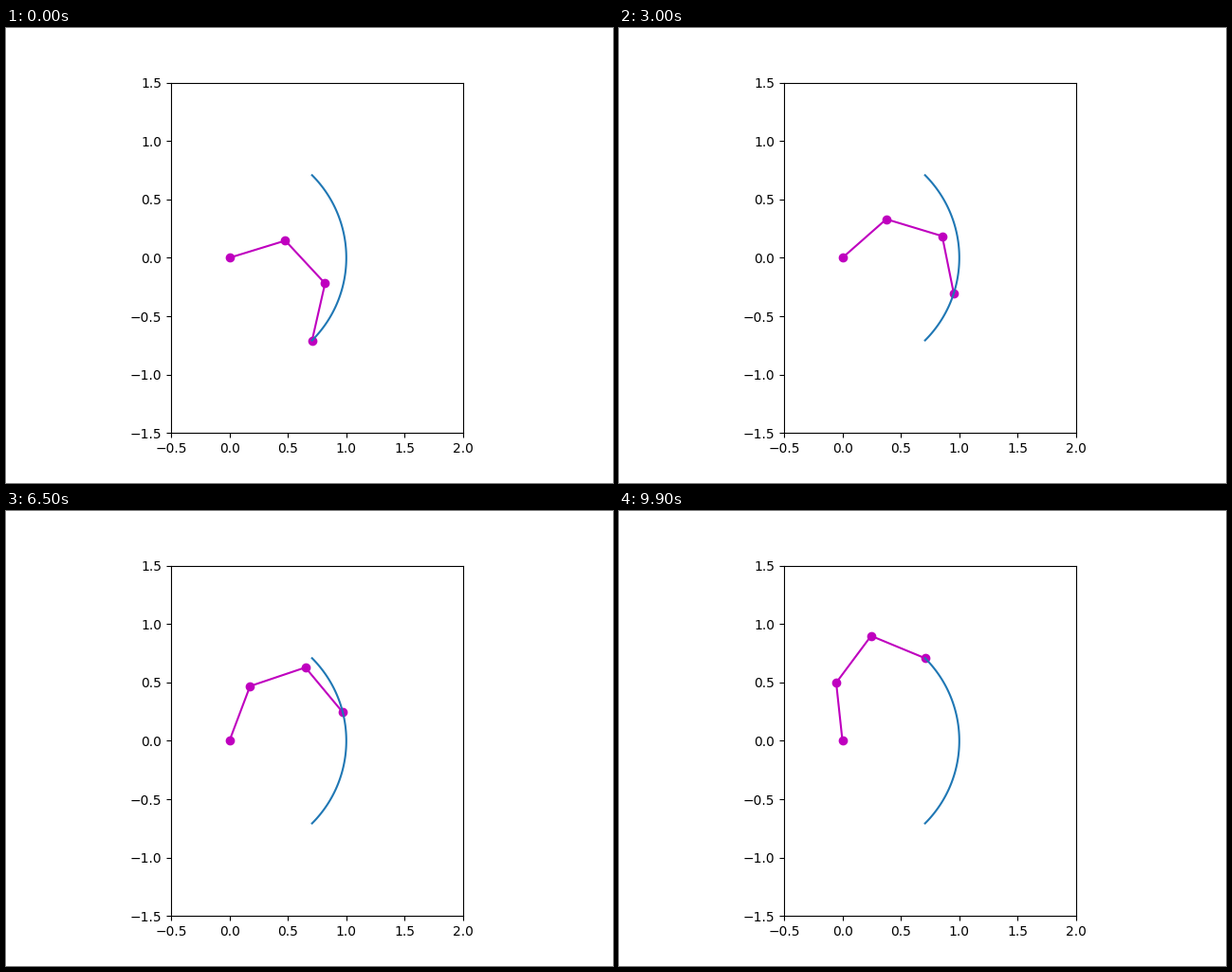
Write a matplotlib script that moves like this. It is 640 by 480 pixels and loops after 10 s.

```python
import numpy as np
import matplotlib.pyplot as plt
from matplotlib.animation import FuncAnimation

FRAMES = 100
LINK = 0.5


def joints(q):
    """Positions of base, both elbows and tip for relative joint angles q."""
    a = np.cumsum(q)
    steps = LINK * np.column_stack([np.cos(a), np.sin(a)])
    return np.vstack([[0, 0], np.cumsum(steps, axis=0)])


def jacobian(p):
    arms = p[-1] - p[:-1]
    return np.vstack([-arms[:, 1], arms[:, 0]])


def start_pose(q2, heading):
    """Pose with its tip at distance 1 from the base in the given direction."""
    q3 = -np.arccos((0.5 - np.cos(q2)) / (2 * np.cos(q2 / 2))) - q2 / 2
    x, y = joints([0, q2, q3])[-1]
    return np.array([heading - np.arctan2(y, x), q2, q3])


def follow(path, q):
    """Track the path with least-norm joint steps."""
    poses = []
    for target in path:
        for _ in range(4):
            p = joints(q)
            q = q + np.linalg.pinv(jacobian(p)) @ (target - p[-1])
        poses.append(joints(q))
    return poses


phi = np.linspace(-np.pi / 4, np.pi / 4, FRAMES)
path = np.column_stack([np.cos(phi), np.sin(phi)])
poses = follow(path, start_pose(np.radians(-64.2), phi[0]))

fig, ax = plt.subplots(figsize=(6.4, 4.8), dpi=100)
ax.set_aspect("equal")
ax.set_xlim(-0.5, 2)
ax.set_ylim(-1.5, 1.5)
arm, = ax.plot([], [], "mo-")
ax.plot(path[:, 0], path[:, 1], color="C0")


def update(i):
    arm.set_data(poses[i][:, 0], poses[i][:, 1])
    return arm,


anim = FuncAnimation(fig, update, frames=FRAMES, interval=100,
                     repeat=True, repeat_delay=0)
plt.show()
```
